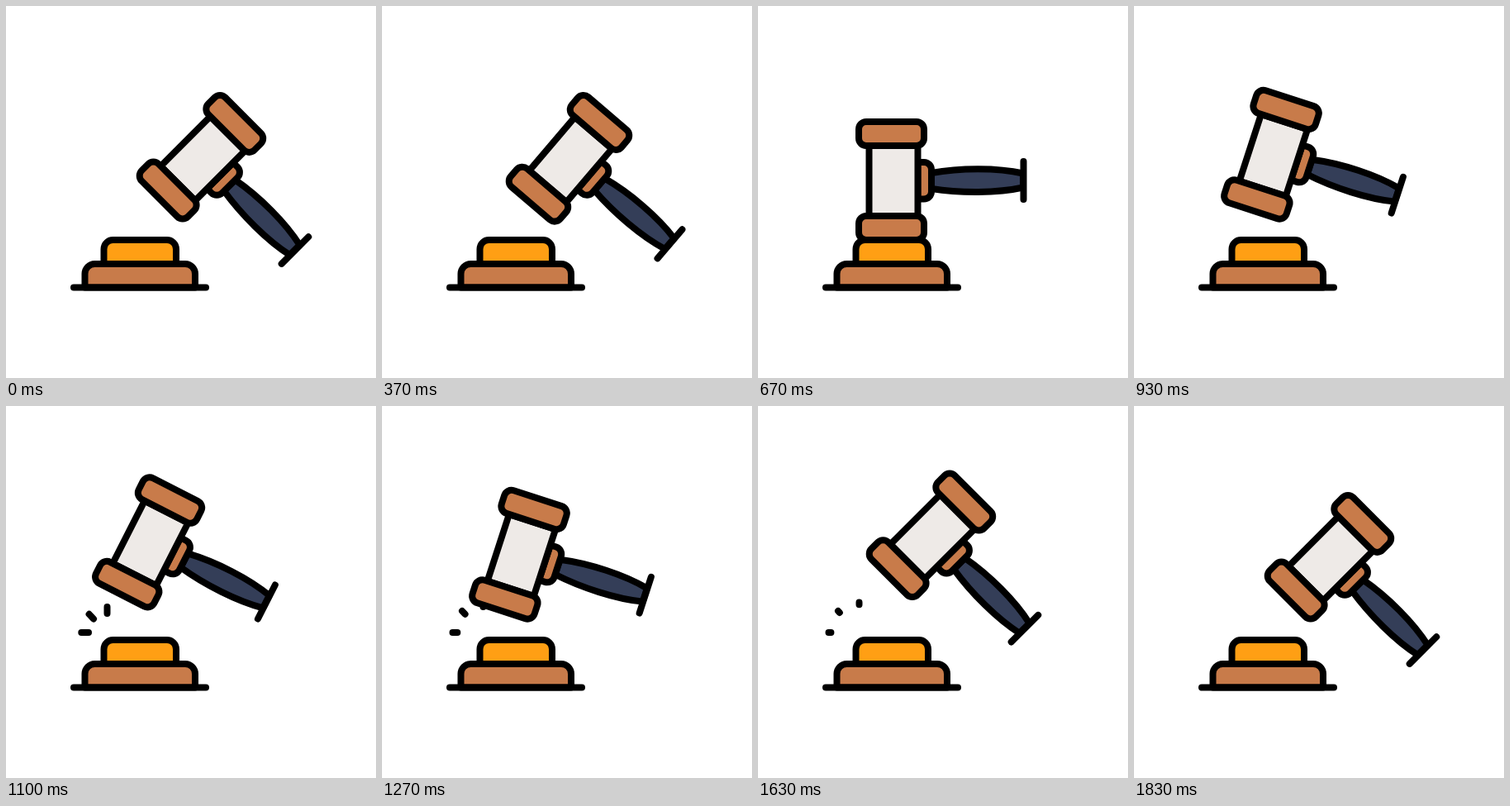
Recreate the animation shown at these times as an HTML page. Size 448 by 450 pixels, loop 1.86 s.

```html
<!DOCTYPE html>
<html lang="en">
<head>
<meta charset="utf-8">
<title>Gavel</title>
<style>
  html, body { margin: 0; width: 100%; height: 100%; overflow: hidden; background: #fff; }
  svg { display: block; width: 448px; height: 450px; }
</style>
</head>
<body>
<svg viewBox="0 0 448 450" fill="none" stroke="#000" stroke-width="8" stroke-linecap="round" stroke-linejoin="round">
  <g id="sparks"></g>
  <path fill="#ff9f14" d="M118.5 312v-18a11 11 0 0 1 11-11h65.500a11 11 0 0 1 11 11v18z"/>
  <path fill="#c87b4a" d="M95.500 340.500v-16.500a12 12 0 0 1 12-12h109.500a12 12 0 0 1 12 12v16.500z"/>
  <path d="M82 340.500H242"/>
  <g id="gavel">
    <path fill="#343e58" d="M210 202C245 195.500 290 195.500 321 202.500V219.500C290 226.500 245 226.500 210 221z"/>
    <path d="M321.500 188V234"/>
    <path fill="#c87b4a" d="M193.500 189h7.500a9 9 0 0 1 9 9v26.500a9 9 0 0 1 -9 9h-7.500z"/>
    <path fill="#eeeae7" d="M134.500 169h59v85h-59z"/>
    <g fill="#c87b4a">
      <rect x="122" y="140" width="79" height="29" rx="9"/>
      <rect x="122" y="254" width="79" height="29" rx="9"/>
    </g>
  </g>
</svg>
<script>
const LOOP = 1860, SWING = 45;
const PIVOT = [264.3, 211.3], HOME = [45, 44];
// Each spark runs from its inner end to its outer end: x1, y1, x2, y2
const SPARKS = [[100, 274, 85.5, 274], [106, 257.5, 97, 248], [122.5, 251, 122.5, 237.5]];

const gavel = document.getElementById('gavel');
const sparks = document.getElementById('sparks');
const clamp = v => Math.min(1, Math.max(0, v));
const ramp = (f, from, to) => clamp((f - from) / (to - from));

// 30 steps per second, on a 10 ms clock
const stepAt = ms => Math.floor((Math.floor(ms / 10) * 10 + 4) * 0.03);

function swing(f) {
  if (f < 20) return 1 - ramp(f, 10, 20);
  if (f > 45) return 1;
  return 1 - Math.abs((f - 20) % 10 - 5) / 5;
}

function sparkPath(f) {
  if (f < 30 || f >= 50) return '';
  const age = (f - 30) % 10;
  const tail = ramp(age, 5, 10), head = ramp(age, 0, 5);
  if (head === tail) return '';
  return SPARKS.map(([x1, y1, x2, y2]) => {
    const at = k => `${x1 + (x2 - x1) * k} ${y1 + (y2 - y1) * k}`;
    return `M${at(tail)}L${at(head)}`;
  }).join('');
}

const trail = document.createElementNS('http://www.w3.org/2000/svg', 'path');
sparks.append(trail);

const start = performance.now();
function draw() {
  const f = stepAt((performance.now() - start) % LOOP);
  const away = f < 30 ? 1 - ramp(f, 10, 20) : ramp(f, 45, 55);
  gavel.setAttribute('transform',
    `translate(${HOME[0] * away} ${HOME[1] * away}) rotate(${SWING * swing(f)} ${PIVOT})`);
  trail.setAttribute('d', sparkPath(f));
  requestAnimationFrame(draw);
}
draw();
</script>
</body>
</html>
```
